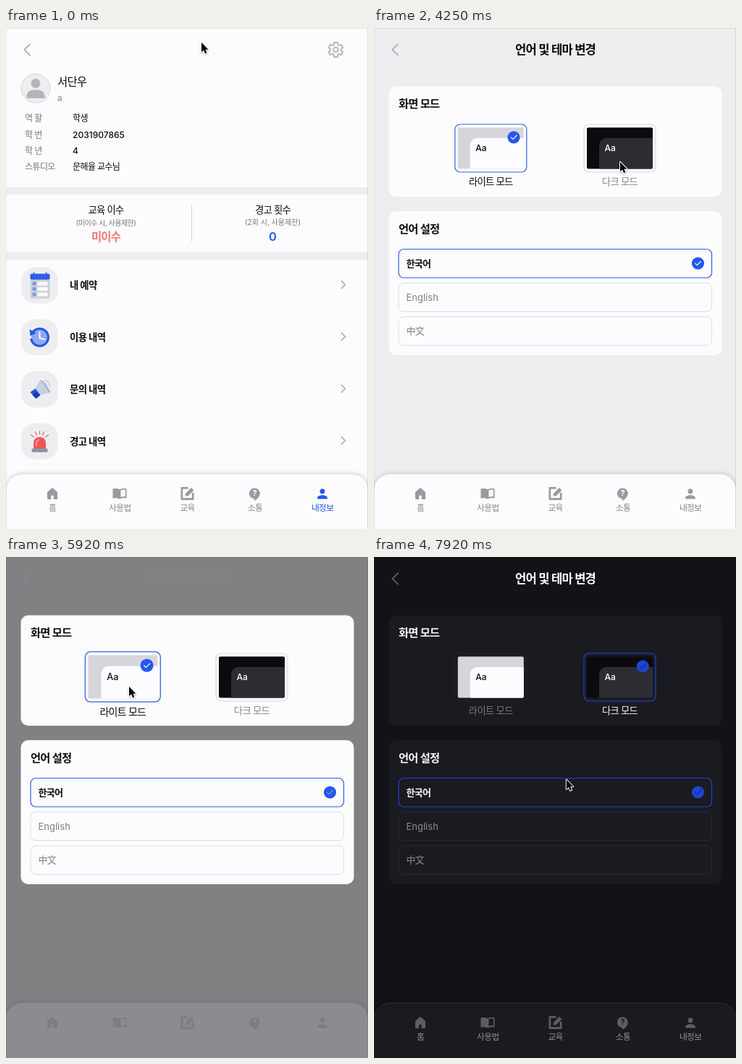
Write an HTML page with a canvas that moves like this. It is 500 px wide and 692 px high and loops after 8 s.

```html
<!DOCTYPE html>
<html lang="ko">
<head>
<meta charset="utf-8">
<style>
html, body { margin: 0; width: 100%; height: 100%; overflow: hidden; background: #fcfcfe; }
canvas { display: block; width: 500px; height: 692px; }
</style>
</head>
<body>
<canvas id="stage"></canvas>
<script>
const W = 500, H = 692, LOOP = 8000;
const canvas = document.getElementById('stage');
const ratio = window.devicePixelRatio || 1;
canvas.width = W * ratio;
canvas.height = H * ratio;
const ctx = canvas.getContext('2d');

const FONT = 'Inter, "Noto Sans CJK KR", "Noto Sans CJK", sans-serif';
const BLUE = '#2457e6', GREY = '#9a9a9e', PALE = '#b6b6ba', BAND = '#eeeef0', PAPER = '#fcfcfe', INK = '#0c0c0e';

// [start, end, x, y]: the pointer reaches x, y at end
const MOVES = [
  [60, 840, 448, 24],
  [1500, 2250, 64, 270],
  [2480, 3090, 188, 172],
  [3120, 3250, 190, 182],
  [3400, 4090, 340, 185],
  [5060, 5800, 170, 179],
  [6150, 6800, 338, 180],
  [7540, 7980, 262, 314]
];
const START = [270, 20];
const SETTINGS_AT = 1000, THEME_PAGE_AT = 2420;
const TOGGLES = [4330, 5850, 7050], FADE = 240;

const ICONS = {
  home: 'M12 3 4 9.600V20a1 1 0 0 0 1 1h5v-6h4v6h5a1 1 0 0 0 1-1V9.600z',
  book: 'M12 6C9 4.500 5.500 4.300 2 5v14c3.500-.7 7-.5 10 1 3-1.500 6.500-1.700 10-1V5c-3.500-.7-7-.5-10 1z' +
        'M13.500 7.300v10c2-.8 4.500-1.200 6.800-1V6.400c-2.300-.2-4.700.1-6.800.9z',
  pencil: 'M9 16v-4L18 3l4 4-9 9z',
  bubble: 'M12 2.500a8.500 8.500 0 0 0-1 17V23c4-1.800 9.500-6 9.500-12A8.500 8.500 0 0 0 12 2.500z',
  person: 'M12 12a4 4 0 1 0 0-8 4 4 0 0 0 0 8zm0 2c-3 0-8 1.400-8 4v2h16v-2c0-2.600-5-4-8-4z',
  lock: 'M18 8h-1V6A5 5 0 0 0 7 6v2H6a2 2 0 0 0-2 2v10a2 2 0 0 0 2 2h12a2 2 0 0 0 2-2V10a2 2 0 0 0-2-2z' +
        'M9 8V6a3 3 0 0 1 6 0v2zM12 13a2 2 0 1 1 0 4 2 2 0 0 1 0-4z',
  shield: 'M12 1 3 5v6c0 5.500 3.800 10.700 9 12 5.200-1.300 9-6.500 9-12V5z'
};
for (const k in ICONS) ICONS[k] = new Path2D(ICONS[k]);

const clamp = v => Math.max(0, Math.min(1, v));
const smooth = p => p * p * (3 - 2 * p);
const rgb = h => [1, 3, 5].map(i => parseInt(h.slice(i, i + 2), 16));

function mix(a, b, t) {
  const to = rgb(b);
  return 'rgb(' + rgb(a).map((v, i) => Math.round(v + (to[i] - v) * t)) + ')';
}

function text(s, x, cy, size, color, weight = 400, align = 'left') {
  const hangul = (s.match(/[\u3131-\ud79d\u4e00-\u9fff]/g) || []).length;
  ctx.font = `${weight} ${size}px ${FONT}`;
  ctx.letterSpacing = hangul * 2 > s.length ? `${-0.05 * size}px` : '0px';
  ctx.textAlign = align;
  ctx.fillStyle = color;
  ctx.fillText(s, x, cy + size * 0.37);
}

function rect(x, y, w, h, color) {
  ctx.fillStyle = color;
  ctx.fillRect(x, y, w, h);
}

function round(x, y, w, h, r, fill, stroke, lw = 1) {
  ctx.beginPath();
  ctx.roundRect(x, y, w, h, r);
  if (fill) { ctx.fillStyle = fill; ctx.fill(); }
  if (stroke) { ctx.strokeStyle = stroke; ctx.lineWidth = lw; ctx.stroke(); }
}

function disc(x, y, r, color) {
  ctx.beginPath();
  ctx.arc(x, y, r, 0, 7);
  ctx.fillStyle = color;
  ctx.fill();
}

function poly(points, fill) {
  ctx.beginPath();
  points.forEach(([x, y]) => ctx.lineTo(x, y));
  ctx.closePath();
  ctx.fillStyle = fill;
  ctx.fill();
}

function line(d, color, lw) {
  ctx.strokeStyle = color;
  ctx.lineWidth = lw;
  ctx.stroke(new Path2D(d));
}

function at(x, y, scale, draw) {
  ctx.save();
  ctx.translate(x, y);
  ctx.scale(scale, scale);
  draw();
  ctx.restore();
}

function icon(name, x, y, scale, color) {
  at(x, y, scale, () => {
    ctx.translate(-12, -12);
    ctx.fillStyle = color;
    ctx.fill(ICONS[name], 'evenodd');
  });
}

function gear(x, y, scale, color, lw) {
  at(x, y, scale, () => {
    ctx.beginPath();
    for (let i = 0; i < 6; i++) {
      for (const [off, r] of [[-21, 7.6], [-13, 10.3], [13, 10.3], [21, 7.6]]) {
        const a = (i * 60 - 90 + off) * Math.PI / 180;
        ctx.lineTo(Math.cos(a) * r, Math.sin(a) * r);
      }
    }
    ctx.closePath();
    ctx.strokeStyle = color;
    ctx.lineWidth = lw;
    ctx.stroke();
    ctx.beginPath();
    ctx.arc(0, 0, 3.4, 0, 7);
    ctx.stroke();
  });
}

const back = color => line('M33 22.500 25.300 30 33 37.500', color, 2.1);
const chevron = y => line(`M463.500 ${y - 5}l5 5-5 5`, PALE, 1.8);

function tick(x, y, fill, mark) {
  disc(x, y, 8.6, fill);
  at(x, y, 1, () => line('M-3.700 .2-1.200 2.700 3.900-2.500', mark, 1.2));
}

function calendar() {
  round(-13, -16, 27, 34, 2, '#d0d0d6');
  round(-13, -16, 27, 8, 2, '#2f5fe4');
  for (const x of [-8, 9]) round(x - 1, -18, 2, 4, 1, '#2f5fe4');
  for (const y of [-5, 2.5, 10]) {
    round(-10, y, 5, 5, 1, '#8098ea');
    round(-3, y, 14, 5, 1, '#fafafc');
  }
}

function clock() {
  disc(0, 0, 11.5, '#8fa6f2');
  ctx.beginPath();
  ctx.arc(0, 0, 12, -2.55, 2.9);
  ctx.strokeStyle = BLUE;
  ctx.lineWidth = 3;
  ctx.stroke();
  poly([[-14, -11], [-13, -2], [-5, -6]], BLUE);
  line('M0-7V1L7 3', '#fff', 2);
}

function megaphone() {
  poly([[-7, 0], [1, -13], [13, 5], [-1, 8]], '#c6d0e4');
  poly([[1, -13], [4, -12], [15, 3], [13, 5]], '#a4b4d2');
  poly([[-13, 4], [-6, -1], [1, 8], [-5, 13]], '#2450dc');
  poly([[-10, 8], [-5, 4], [1, 8], [-5, 13]], '#183aa8');
  line('M5-10a6 6 0 0 1 5 7M7-13a10 10 0 0 1 7 10', '#bcc2ce', 1.2);
}

function siren() {
  round(-8.5, -6, 17, 17, [8, 8, 0, 0], '#f0565a');
  line('M-4.500 6V1a4 4 0 0 1 3-3', '#f9a4a4', 1.6);
  round(-11, 10, 22, 5, 1, '#8b95a5');
  line('M0-14v4M-6-13l2 4M6-13l-2 4M-12-9l4 3M12-9l-4 3', '#f0686a', 1.3);
}

function profile() {
  rect(0, 0, W, H, PAPER);
  back(PALE);
  gear(455.5, 30, 1, PALE, 2);
  round(21, 63.5, 40, 40, 20, BAND, '#d6d6da');
  disc(41, 76.5, 6.5, '#b4b4bb');
  round(28, 85.5, 26, 11.5, [11, 11, 2, 2], '#b4b4bb');
  text('서단우', 71, 74, 15.4, INK, 500);
  text('a', 71, 97, 12, '#8a8a8e');
  const info = [['역 할', '학생'], ['학 번', '2031907865'], ['학 년', '4'], ['스튜디오', '문해율 교수님']];
  info.forEach(([label, value], i) => {
    const y = 125 + i * 22.2;
    text(label, 26, y, 12, '#77777b');
    text(value, 92, y, 12, INK, 500);
  });
  rect(0, 220, W, 10, BAND);
  rect(0, 309.5, W, 10.5, BAND);
  rect(256, 244, 1, 51, '#d8d8dc');
  text('교육 이수', 138, 251, 13.3, INK, 500, 'center');
  text('(미이수 시, 사용제한)', 138, 269, 10, '#77777b', 400, 'center');
  text('미이수', 138, 288, 15.4, '#f07676', 600, 'center');
  text('경고 횟수', 368.5, 251, 13.3, INK, 500, 'center');
  text('(2회 시, 사용제한)', 368.5, 268, 10, '#77777b', 400, 'center');
  text('0', 368.5, 288, 16.5, BLUE, 600, 'center');
  const items = [['내 예약', calendar], ['이용 내역', clock], ['문의 내역', megaphone], ['경고 내역', siren]];
  items.forEach(([label, art], i) => {
    const y = 355.5 + i * 71.8;
    round(21, y - 25, 51, 50, 19, BAND);
    at(46.5, y, 1, art);
    text(label, 88, y, 13.4, INK, 600);
    chevron(y - 1);
  });
}

function settings() {
  rect(0, 0, W, H, PAPER);
  back(PALE);
  text('설정', 250.5, 30, 16.6, INK, 600, 'center');
  rect(0, 60, W, 10, BAND);
  rect(0, 301, W, 10, BAND);
  text('일반', 20.5, 94, 15.2, '#858589', 500);
  text('이용안내', 20.5, 335, 15.2, '#858589', 500);
  const rows = [['내 정보 변경', 147], ['비밀번호 변경', 208.5], ['언어 및 테마 변경', 270.5], ['개인정보처리방침', 387.5]];
  for (const [label, y] of rows) {
    text(label, 61.5, y, 13.4, INK, 600);
    chevron(y);
  }
  icon('person', 30.5, 147, 0.95, GREY);
  disc(38, 151, 6.5, PAPER);
  gear(38.5, 151, 0.45, GREY, 3.4);
  icon('lock', 33, 208.5, 0.98, GREY);
  line('M22.500 264h14M29.500 261v3M34 264c-1.500 6-6 10-11 12.500M26 267c1.500 4 4 6.500 7.500 8.500M33.500 280l5-13 5 13M35.300 276h6.500', GREY, 1.7);
  icon('shield', 33, 387.5, 0.95, GREY);
  line('M28.500 387.500l3.200 3.200 6-6', PAPER, 1.9);
  rect(0, 425.5, W, 1, '#d6d6da');
  text('Copyright 2024. 문해율 all rights reserved.', 250.5, 452, 10.75, '#d2d2d5', 400, 'center');
}

function thumb(cx, label, night, picked, hover, dark) {
  const c = dark ? { on: '#1f44cc', off: '#222229', ink: '#f6f6f8', dim: '#77777c', gap: '#1a1a21', mark: '#152c86' }
    : { on: '#2f60e0', off: '#dadade', ink: INK, dim: '#88888c', gap: PAPER, mark: '#fff' };
  at(cx, 176, picked && hover ? 1.05 : 1, () => {
    ctx.translate(0, -176);
    round(-49.5, 133, 99, 66, 7, c.gap, picked ? c.on : c.off, 1.2);
    round(-45.5, 137.5, 91, 57, 2, night ? '#0b0b0e' : '#d6d6da');
    round(-28.500, 152, 74, 42.5, [10, 0, 2, 0], night ? '#2d2c33' : PAPER);
    text('Aa', -21, 165.5, 12, night ? '#fff' : INK, 500);
    if (picked) tick(31.7, 151, dark ? c.on : '#2457f0', c.mark);
    text(label, 0, 212, 13.3, picked ? c.ink : c.dim, picked ? 500 : 400, 'center');
  });
}

function themePage(dark, fade, x, y) {
  const card = dark ? '#1a1a21' : PAPER, ink = dark ? '#f6f6f8' : INK;
  const edge = dark ? '#2a2a30' : '#dcdce0', dim = dark ? '#8c8c91' : '#808084';
  rect(0, 0, W, H, mix(BAND, '#131216', fade));
  back(mix(PALE, '#55555a', fade));
  text('언어 및 테마 변경', 250.5, 30, 16.6, mix(INK, '#ffffff', fade), 600, 'center');
  round(20.5, 80.5, 460, 152.5, 10, card);
  round(20.5, 253, 460, 199, 10, card);
  text('화면 모드', 34, 104, 15.3, ink, 600);
  text('언어 설정', 34, 277, 15.3, ink, 600);
  const over = cx => Math.abs(x - cx) < 50 && y > 133 && y < 220;
  thumb(161.3, '라이트 모드', false, !dark, over(161.3), dark);
  thumb(339.5, '다크 모드', true, dark, over(339.5), dark);
  ['한국어', 'English', '中文'].forEach((label, i) => {
    const top = 305.5 + i * 46.7, on = i === 0;
    round(34, top, 432.5, 39.5, 7, null, on ? (dark ? '#1f44cc' : '#2f60e0') : edge, on ? 1.2 : 1);
    text(label, 44.5, top + 19.7, 13, on ? ink : dim, on ? 600 : 400);
  });
  tick(447.5, 325, dark ? '#1f44cc' : '#2457f0', mix('#ffffff', '#152c86', fade));
}

function nav(fade, active) {
  const bg = mix(PAPER, '#1b1a21', fade);
  ctx.save();
  ctx.shadowColor = `rgba(0,0,0,${0.2 - 0.1 * fade})`;
  ctx.shadowBlur = 7 * ratio;
  round(0, 616, W, 90, [22, 22, 0, 0], bg);
  ctx.restore();
  round(0, 616, W, 90, [22, 22, 0, 0], null, mix('#e2e2e5', '#2c2b32', fade));
  const glyph = mix(GREY, '#5d5d63', fade), label = mix('#858589', '#8f8f94', fade);
  icon('home', 64, 643, 0.88, glyph);
  icon('book', 157, 643, 0.95, glyph);
  at(250.5, 643, 0.9, () => {
    ctx.translate(-12, -12);
    line('M20.500 12v8.500h-17v-17H12', glyph, 3);
  });
  icon('pencil', 250.5, 643, 0.9, glyph);
  icon('bubble', 343.5, 643.5, 0.85, glyph);
  text('?', 343.5, 642, 11, bg, 700, 'center');
  icon('person', 437, 643.5, 0.86, active ? BLUE : glyph);
  ['홈', '사용법', '교육', '소통', '내정보'].forEach((s, i) => {
    const on = active && i === 4;
    text(s, 64 + i * 93.3, 662.5, 11.7, on ? BLUE : label, 500, 'center');
  });
}

function pointer(x, y) {
  ctx.save();
  ctx.translate(x, y);
  const p = new Path2D('M0 0V13.300L3 10.500 5.100 15.300 7.400 14.300 5.400 9.700H9.400z');
  ctx.shadowColor = 'rgba(0,0,0,.3)';
  ctx.shadowBlur = 2 * ratio;
  ctx.shadowOffsetY = ratio;
  ctx.strokeStyle = '#fff';
  ctx.lineWidth = 2;
  ctx.stroke(p);
  ctx.shadowColor = 'transparent';
  ctx.fillStyle = '#000';
  ctx.fill(p);
  ctx.restore();
}

function pointerAt(t) {
  let [x, y] = START;
  for (const [t0, t1, x1, y1] of MOVES) {
    const p = smooth(clamp((t - t0) / (t1 - t0)));
    x += (x1 - x) * p;
    y += (y1 - y) * p;
  }
  return [x, y];
}

function themeAt(t) {
  let dark = false, fade = 0;
  for (const start of TOGGLES) {
    if (t < start) break;
    dark = !dark;
    const p = clamp((t - start) / FADE), eased = 1 - (1 - p) ** 2;
    fade = dark ? eased : 1 - eased;
  }
  return { dark, fade };
}

function render(t) {
  ctx.setTransform(ratio, 0, 0, ratio, 0, 0);
  ctx.lineCap = ctx.lineJoin = 'round';
  const [x, y] = pointerAt(t), { dark, fade } = themeAt(t);
  if (t < SETTINGS_AT) profile();
  else if (t < THEME_PAGE_AT) settings();
  else themePage(dark, fade, x, y);
  nav(fade, t < SETTINGS_AT);
  ctx.strokeStyle = 'rgba(0,0,0,.1)';
  ctx.lineWidth = 1;
  ctx.strokeRect(0.5, 0.5, W - 1, H + 4);
  pointer(x, y);
}

const origin = performance.now();
function tickFrame() {
  render((performance.now() - origin) % LOOP);
  requestAnimationFrame(tickFrame);
}
tickFrame();
</script>
</body>
</html>
```
